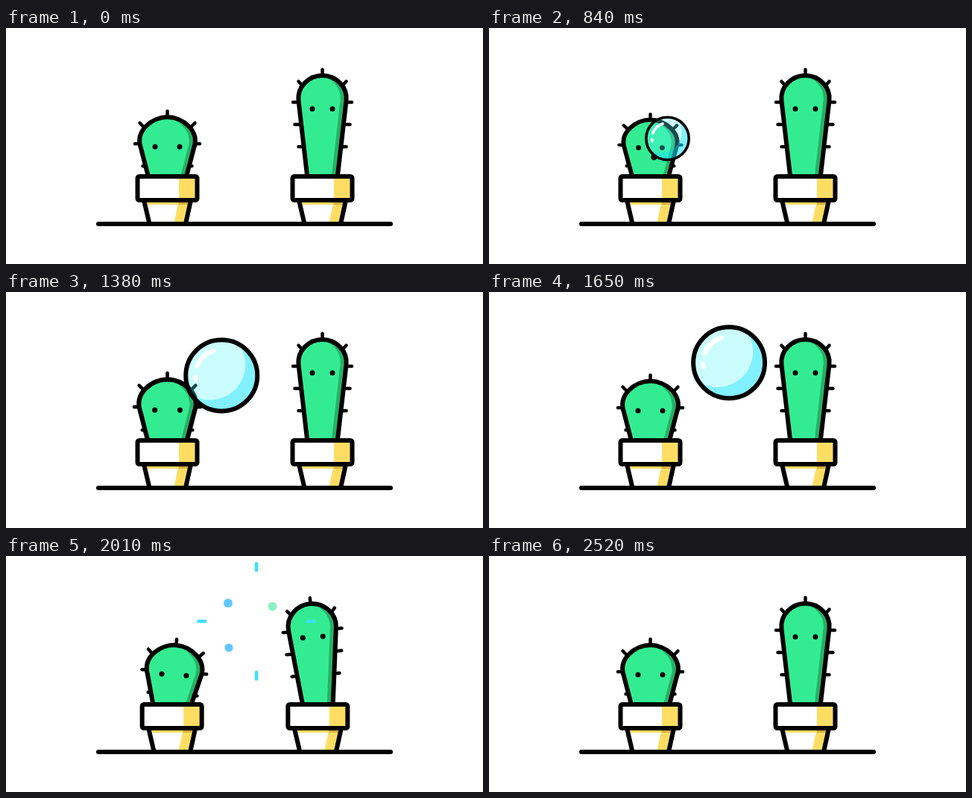
Animation, 640 px wide and 318 px high, one loop 2550 ms. Source, as an HTML page with a canvas:

```html
<!DOCTYPE html>
<html>
<head>
<meta charset="utf-8">
<title>Cactus bubble</title>
<style>
html, body { margin: 0; width: 640px; height: 318px; overflow: hidden; background: #fff; }
canvas { display: block; }
</style>
</head>
<body>
<canvas id="stage" width="640" height="318"></canvas>
<script>
const ctx = document.getElementById('stage').getContext('2d');
const LOOP = 2550, GROW = 680, RELEASE = 1075, POP = 1765;
const BLACK = '#000', GREEN = '#33ec92', DARK_GREEN = '#27b067';
const YELLOW = '#ffdd63', DARK_YELLOW = '#d3ad40';

const clamp = x => Math.max(0, Math.min(1, x));
const span = (t, a, b) => clamp((t - a) / (b - a));
const easeInOut = u => (1 - Math.cos(Math.PI * u)) / 2;
const easeOut = u => 1 - (1 - u) ** 3;

// Eased interpolation through [time, value] keys
function track(t, keys) {
  let value = keys[0][1];
  for (let i = 1; i < keys.length; i++) {
    const [a, from] = keys[i - 1], [b, to] = keys[i];
    if (t >= a) value = from + (to - from) * easeInOut(span(t, a, b));
  }
  return value;
}

const BREATH = [[150, 0], [610, 1], [810, -.2], [1200, .38], [1500, 0]];
const SWAY = [[POP, 0], [1890, 12.5], [2040, -8], [2280, 4.5], [2440, 0]];

const SHORT = {
  x: 216.5,
  body: new Path2D('M-23.5 10L-35.5-36C-44-60-20-78 0-78S44-60 35.5-36L23.5 10Z'),
  eye: [16.5, -38],
  top: -78,
  spines: [[-37, -70, -31, -64], [-43.5, -42, -36, -42], [-33, -12, -28, -12]]
};
const TALL = {
  x: 424.5,
  body: new Path2D('M-19.4 10L-32-100C-34-119-18-134 0-134S34-119 32-100L19.4 10Z'),
  eye: [13.5, -89],
  top: -134,
  spines: [[-32, -126, -27, -120.5], [-39.5, -98, -33, -98], [-37, -68, -29, -68], [-32, -38, -26, -38]]
};

function line(x1, y1, x2, y2, width, color = BLACK) {
  ctx.beginPath();
  ctx.moveTo(x1, y1);
  ctx.lineTo(x2, y2);
  ctx.lineWidth = width;
  ctx.strokeStyle = color;
  ctx.stroke();
}

function dot(x, y, r, color = BLACK) {
  ctx.beginPath();
  ctx.arc(x, y, r, 0, 7);
  ctx.fillStyle = color;
  ctx.fill();
}

function rect(x, y, w, h, color) {
  ctx.fillStyle = color;
  ctx.fillRect(x, y, w, h);
}

function outline(path) {
  ctx.lineWidth = 6;
  ctx.strokeStyle = BLACK;
  ctx.stroke(path);
}

const potBody = new Path2D('M-31.5 34L-24 66H24.5L31.5 34Z');
const potShade = new Path2D('M15.5 34L8.5 66H30L36 34Z');
const potRim = new Path2D();
potRim.roundRect(-40, 2, 80, 32, 2.5);

function drawPot() {
  ctx.save();
  ctx.clip(potBody);
  rect(-40, 34, 80, 32, '#fff');
  ctx.fillStyle = YELLOW;
  ctx.fill(potShade);
  rect(-40, 34, 80, 6, YELLOW);
  rect(15, 34, 25, 6, DARK_YELLOW);
  ctx.restore();
  outline(potBody);
  rect(-40, 2, 80, 32, '#fff');
  rect(15.5, 2, 24, 32, YELLOW);
  outline(potRim);
}

function drawCactus({ x, body, eye, top, spines }, shift, breath) {
  ctx.save();
  ctx.translate(x + shift, 198);
  ctx.save();
  ctx.rotate(shift * .012);
  ctx.translate(0, -13);
  ctx.scale(1 + .18 * breath, 1 + .29 * breath);
  ctx.translate(0, 13);
  line(0, top, 0, top - 8, 4.5);
  for (const [x1, y1, x2, y2] of spines) {
    line(x1, y1, x2, y2, 4.5);
    line(-x1, y1, -x2, y2, 4.5);
  }
  ctx.save();
  ctx.clip(body);
  ctx.fillStyle = DARK_GREEN;
  ctx.fill(body);
  ctx.translate(-8, 0);
  ctx.fillStyle = GREEN;
  ctx.fill(body);
  ctx.restore();
  outline(body);
  dot(-eye[0], eye[1], 3.5);
  dot(eye[0], eye[1], 3.5);
  ctx.restore();
  drawPot();
  ctx.restore();
}

function drawMouth(t) {
  const r = t < 620 ? 6.6 * easeOut(span(t, 150, 380)) : 6.6 * (1 - span(t, 620, 1170));
  if (r > 0) dot(215.3 + .0072 * t, 174, r);
}

function drawBubble(t) {
  if (t < GROW || t >= POP) return;
  const size = Math.sin(span(t, GROW, RELEASE) * Math.PI / 2);
  const drift = span(t, RELEASE, POP);
  ctx.save();
  ctx.translate(221 + 31 * size + 84 * drift, 174 - 42 * size - 44 * drift);
  ctx.scale(size, size);
  const disc = new Path2D();
  disc.arc(0, 0, 48, 0, 7);
  ctx.save();
  ctx.clip(disc);
  rect(-50, -50, 100, 100, 'rgba(85,248,255,.3)');
  const crescent = new Path2D();
  crescent.rect(-80, -80, 160, 160);
  crescent.arc(-16, -15, 48, 0, 2 * Math.PI);
  ctx.fillStyle = 'rgba(0,220,255,.36)';
  ctx.fill(crescent, 'evenodd');
  ctx.restore();
  outline(disc);
  ctx.strokeStyle = '#fff';
  for (const [from, to] of [[3.5, 4.4], [2.98, 3.09]]) {
    ctx.beginPath();
    ctx.arc(0, 0, 35, from, to);
    ctx.stroke();
  }
  ctx.restore();
}

function drawBurst(t) {
  if (t < POP) return;
  const u = span(t, POP, POP + 350);
  const head = 30 + 51 * easeOut(u);
  const tail = 30 + 51 * easeOut(span(t, POP + 125, POP + 475));
  ctx.save();
  ctx.translate(336, 88);
  if (head - tail > .5) {
    for (const [x, y] of [[0, -1], [0, 1], [-1, 0], [1, 0]]) {
      line(x * (head - 2), y * (head - 2), x * (tail + 2), y * (tail + 2), 4.5, '#3ce0ff');
    }
  }
  const spread = easeOut(u) / .973, r = 6 * Math.min(1, (1 - u) * 4);
  dot(-38 * spread, -24.5 * spread, r, '#62c8ff');
  dot(-37 * spread, 35.5 * spread, r * .93, '#62c8ff');
  dot(21.5 * spread, -20 * spread, r, '#8cf2c4');
  ctx.restore();
}

function draw(now) {
  const t = now % LOOP;
  const sway = track(t, SWAY);
  rect(0, 0, 640, 318, '#fff');
  ctx.lineCap = ctx.lineJoin = 'round';
  drawCactus(SHORT, -sway, track(t, BREATH));
  drawCactus(TALL, sway, 0);
  line(124, 264, 516, 264, 6);
  drawMouth(t);
  drawBubble(t);
  drawBurst(t);
}

const start = performance.now();
function tick() {
  draw(performance.now() - start);
  requestAnimationFrame(tick);
}
tick();
</script>
</body>
</html>
```
